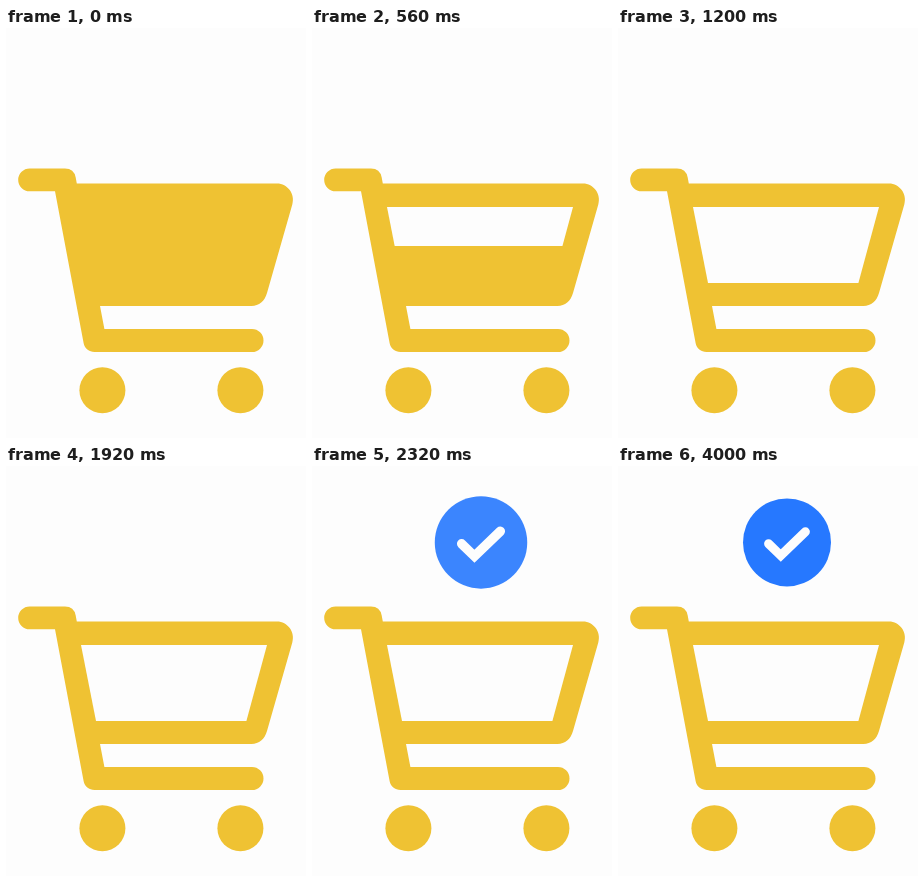
An HTML page for the animation above (4.04 s loop, 300 by 410 pixels).

```html
<!DOCTYPE html>
<html lang="en">
<head>
<meta charset="utf-8">
<title>Cart checked out</title>
<style>
  html, body { margin: 0; width: 100%; height: 100%; overflow: hidden; background: #fdfdfd; }
  svg { display: block; width: 100%; height: 100%; }
</style>
</head>
<body>
<svg viewBox="0 0 300 410">
  <g fill="#efc233">
    <path d="M23.6 140.5H59Q68 140.5 69.7 149.5L70.8 155.5H271C281.5 155.5 289.5 166 286.3 176.5L261 265C258.8 273 253 278 245.5 278H94L98.4 301H246a11.5 11.5 0 0 1 0 23H88.5C83 324 78.6 320.5 77.6 315L49 163.3H23.6a11.4 11.4 0 0 1 0-22.8Z"/>
    <circle cx="96.4" cy="362.3" r="23"/>
    <circle cx="234.4" cy="362.3" r="23"/>
  </g>
  <path id="hole" fill="#fdfdfd"/>
  <g id="badge">
    <circle r="44" fill="#2678ff"/>
    <path d="M-18.4 1.3L-6.2 13.2L18.4-10.6" fill="none" stroke="#fdfdfd" stroke-width="9" stroke-linecap="round"/>
  </g>
</svg>
<script>
  const LOOP = 4040, STEP = 80;
  const hole = document.getElementById('hole');
  const badge = document.getElementById('badge');

  const progress = (t, start, length) => Math.min(1, Math.max(0, (t - start) / length));
  const softInOut = p => p + p * (1 - p) * (1.12 * p - 0.34);
  const cubicOut = p => 1 - (1 - p) ** 3;

  function draw(t) {
    // The basket empties from the top down
    const k = softInOut(progress(t, 0, 1200));
    hole.setAttribute('d', `M75 179H261L${261 - 20.6 * k} ${179 + 76 * k}H${75 + 15 * k}Z`);

    // The badge shrinks into place while fading in
    const b = cubicOut(progress(t, 2000, 600));
    badge.setAttribute('transform', `translate(169 76.4) scale(${1.5 - 0.5 * b})`);
    badge.setAttribute('opacity', b);
  }

  function tick() {
    const t = performance.now() % LOOP;
    draw(Math.floor(t / STEP) * STEP);
    requestAnimationFrame(tick);
  }
  tick();
</script>
</body>
</html>
```
